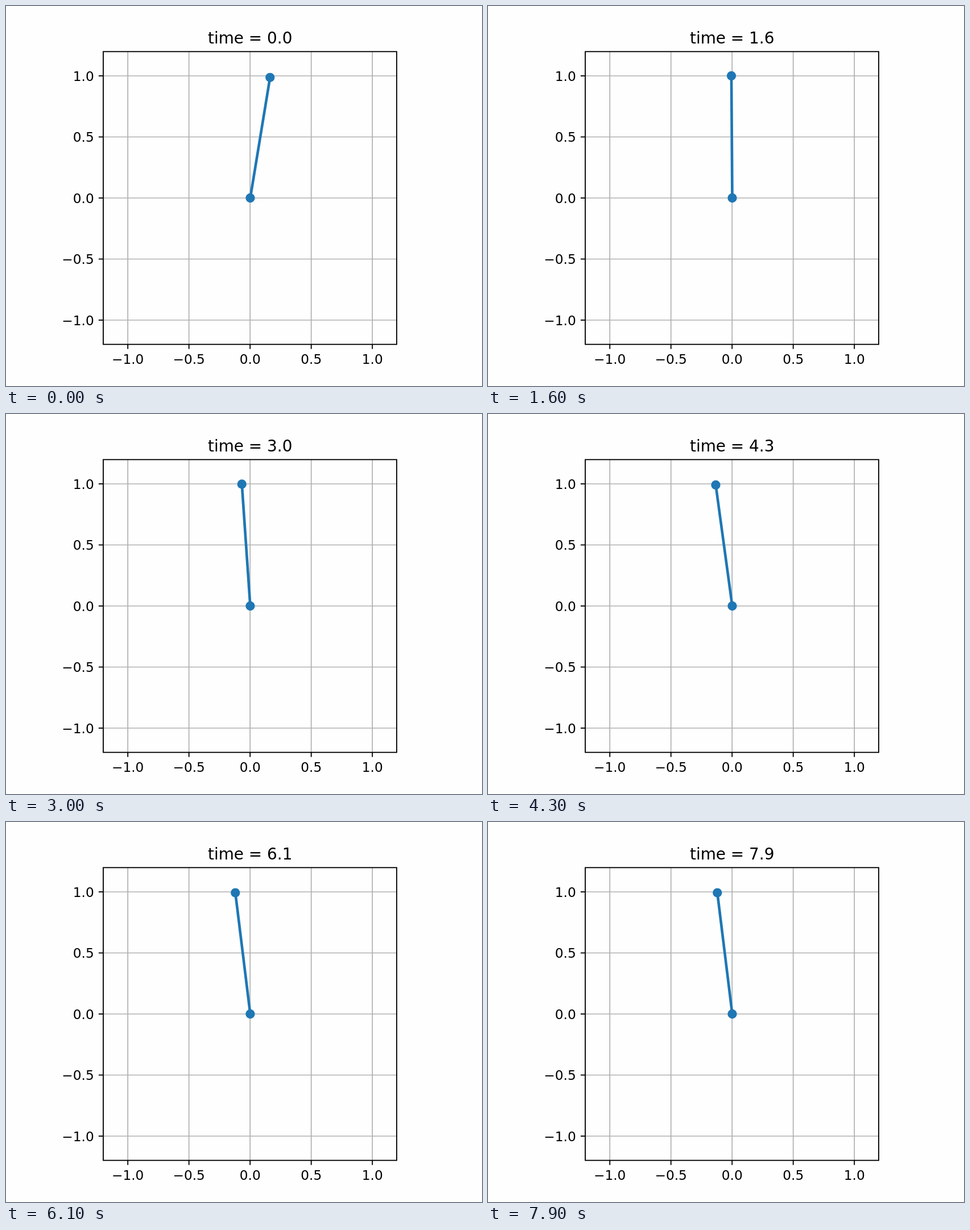
Write an HTML page that moves like this. It is 837 px wide and 669 px high and loops after 8000 ms.

```html
<!DOCTYPE html>
<html>
<head>
<meta charset="utf-8">
<style>
  html, body { margin: 0; width: 100%; height: 100%; overflow: hidden; background: #fefefe; }
  svg { display: block; }
  text { font: 23.25px "DejaVu Sans", sans-serif; fill: #000; }
  #title { font-size: 27.9px; }
  .axis { stroke: #000; stroke-width: 1.86; fill: none; }
  .grid { stroke: #b0b0b0; stroke-width: 1.7; }
  #rod { stroke: #1f77b4; stroke-width: 4.65; }
  circle { fill: #1f77b4; }
</style>
</head>
<body>
<svg width="837" height="669" viewBox="0 0 837 669">
  <g id="plot"></g>
  <line id="rod" x1="429.5" y1="338"/>
  <circle cx="429.5" cy="338" r="8.15"/>
  <circle id="bob" r="8.15"/>
  <rect class="axis" x="171" y="80.3" width="516" height="515.4"/>
  <text id="title" x="429.2" y="66.3" text-anchor="middle"></text>
</svg>
<script>
const CX = 429.5, CY = 338, UNIT = 215;
const LEFT = 171, RIGHT = 687, TOP = 80.3, BOTTOM = 595.7;
const $ = id => document.getElementById(id);

const line = (cls, x1, y1, x2, y2) =>
  `<line class="${cls}" x1="${x1}" y1="${y1}" x2="${x2}" y2="${y2}"/>`;
const label = (x, y, anchor, v) =>
  `<text x="${x}" y="${y}" text-anchor="${anchor}">${v.toFixed(1).replace('-', '\u2212')}</text>`;

$('plot').innerHTML = [-1, -0.5, 0, 0.5, 1].map(v => {
  const x = 429.2 + v * UNIT, y = CY - v * UNIT;
  return line('grid', x, TOP, x, BOTTOM) + line('grid', LEFT, y, RIGHT, y) +
    line('axis', x, BOTTOM, x, BOTTOM + 8.1) + line('axis', LEFT - 8.1, y, LEFT, y) +
    label(x, 629.6, 'middle', v) + label(154.8, y + 8.6, 'end', v);
}).join('');

// Free swing, integrated both ways from a known state at 0.9 s.
// Angles are clockwise from upright.
function swing(t) {
  const steps = Math.round(Math.abs(t - 0.9) * 1000);
  const h = Math.sign(t - 0.9) / 1000;
  let angle = 251.57 * Math.PI / 180, speed = 6.365;
  for (let i = 0; i < steps; i++) {
    angle += speed * h / 2;
    speed += 15 * Math.sin(angle) * h;
    angle += speed * h / 2;
  }
  return angle;
}

// Catching the rod at the top: [time, horizontal offset]
const settle = [[1.6, -0.007], [1.7, 0.055], [1.8, 0.08], [1.9, 0.06], [2.2, 0.015],
  [2.7, -0.0465], [3, -0.0686], [3.6, -0.12], [4.3, -0.135]];

function offset(t) {
  if (t >= 4.3) return -0.1263 - 0.0087 * Math.cos((t - 4.3) / 1.8 * 7 / 3 * 2 * Math.PI);
  const i = settle.findIndex(p => p[0] > t);
  const [t0, x0] = settle[i - 1], [t1, x1] = settle[i];
  return x0 + (x1 - x0) * (t - t0) / (t1 - t0);
}

function draw(now) {
  const t = Math.floor(now % 8000 / 100) / 10;
  const angle = t < 1.6 ? swing(t) : Math.asin(offset(t));
  const x = CX + UNIT * Math.sin(angle), y = CY - UNIT * Math.cos(angle);
  $('rod').setAttribute('x2', x);
  $('rod').setAttribute('y2', y);
  $('bob').setAttribute('cx', x);
  $('bob').setAttribute('cy', y);
  $('title').textContent = `time = ${t.toFixed(1)}`;
}

const start = performance.now();
function tick() {
  draw(performance.now() - start);
  requestAnimationFrame(tick);
}
tick();
</script>
</body>
</html>
```
